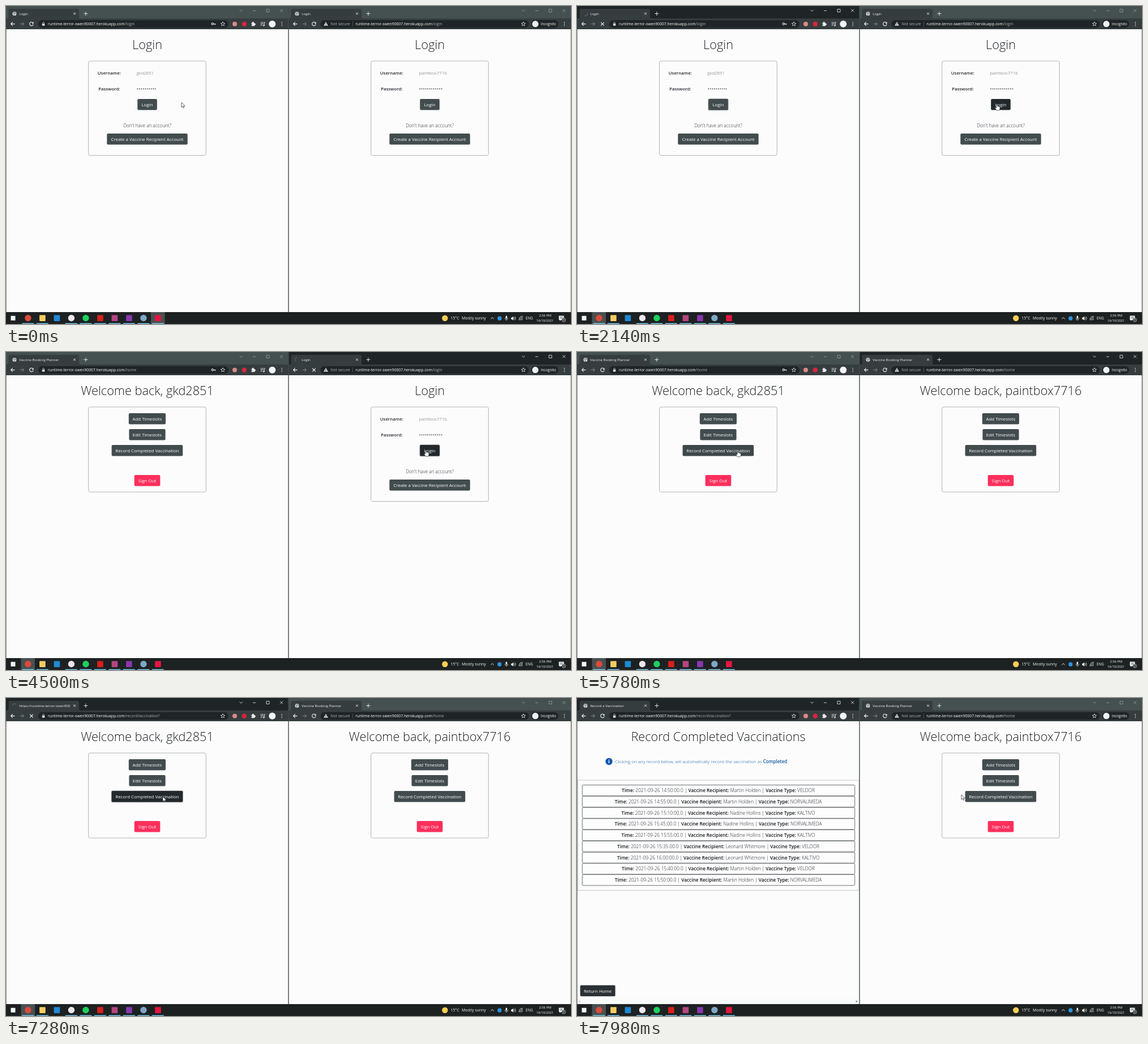
Recreate the animation shown at these times as an HTML page. Size 998x561 px, loop 8000 ms.

```html
<!DOCTYPE html>
<html lang="en">
<head>
<meta charset="utf-8">
<title>Two sessions</title>
<style>
html, body { margin: 0; width: 100%; height: 100%; overflow: hidden; background: #fcfcfd; }
svg { display: block; width: 100vw; height: 100vh; cursor: default; }
text { font-family: "Open Sans", "Noto Sans", sans-serif; }
</style>
</head>
<body>
<svg id="stage" viewBox="0 0 998 561"></svg>
<script>
const LOOP = 8000;
const CLICK_A = 1120, HOME_A = 2620, CLICK_B = 4500, HOME_B = 5300, CLICK_C = 7280, RECORDS = 7720;
const USERS = ['gkd2851', 'paintbox7716'];
const HOST = 'runtime-terror-swen90007.herokuapp.com';
const APP = 'Vaccine Booking Planner';
const PEOPLE = ['Martin Holden', 'Nadine Hollins', 'Leonard Whitmore'];
const TYPES = ['VELDOR', 'NORVALIMEDA', 'KALTIVO'];
// time, person, vaccine
const ROWS = [['14:50', 0, 0], ['14:55', 0, 1], ['15:10', 1, 2], ['15:45', 1, 1], ['15:55', 1, 2],
  ['15:35', 2, 0], ['16:00', 2, 2], ['15:40', 0, 0], ['15:50', 0, 1]];
// time, x, y of the pointer tip
const PATH = [[0, 310, 170], [80, 310, 170], [720, 250, 174], [1220, 250, 174], [2020, 741.5, 173],
  [4850, 741.5, 173], [5780, 284, 174], [6100, 280, 174], [6900, 277, 174], [7440, 277, 174], [7980, 679, 170.5]];
const HOVERS = { loginA: [560, 1270], loginB: [1960, 4930], record: [5760, 7520] };

const within = (t, [a, b]) => t >= a && t < b;
const rect = (x, y, w, h, fill, r = 0, more = '') =>
  `<rect x="${x}" y="${y}" width="${w}" height="${h}" rx="${r}" fill="${fill}" ${more}/>`;
const circle = (x, y, r, fill, more = '') => `<circle cx="${x}" cy="${y}" r="${r}" fill="${fill}" ${more}/>`;
const line = (d, color = '#e4e8e9', w = 1, more = '') =>
  `<path d="${d}" fill="none" stroke="${color}" stroke-width="${w}" ${more}/>`;
const shape = (d, fill, more = '') => `<path d="${d}" fill="${fill}" ${more}/>`;
const text = (x, y, s, size, fill, weight = 400, anchor = 'start', more = '') =>
  `<text x="${x}" y="${y}" font-size="${size}" fill="${fill}" font-weight="${weight}" text-anchor="${anchor}" ${more}>${s}</text>`;
const mid = (y, s, size, fill, weight) => text(249.5, y, s, size, fill, weight, 'middle');
const bold = s => `<tspan font-weight="600">${s}</tspan>`;
const cross = (x, y, r, color, w) => line(`M${x - r} ${y - r}l${2 * r} ${2 * r}m0 ${-2 * r}l${-2 * r} ${2 * r}`, color, w);

// dark: 0 at rest, 1 fully hovered
function button(x, y, w, label, { dark = 0, ring = false, fill } = {}) {
  const mix = (a, b) => Math.round(a + (b - a) * dark);
  fill = fill || `rgb(${mix(66, 34)},${mix(76, 40)},${mix(78, 43)})`;
  return (ring ? rect(x - 0.8, y - 0.8, w + 1.6, 21.1, '#a3a8a9', 2.6) : '') + rect(x, y, w, 19.5, fill, 2) +
    text(x + w / 2, y + 12.8, label, 7.9, '#fff', 500, 'middle');
}

function hoverAmount(t, name) {
  const [a, b] = HOVERS[name];
  if (t < a) return 0;
  return t < b ? Math.min(1, (t - a) / 150) : Math.max(0, 1 - (t - b) / 150);
}

const card = h => rect(145.7, 97, 207.6, h, 'none', 3, 'stroke="#a9aca9" stroke-width=".9"');
const heading = s => mid(76, s, 21.7, '#1c1f22', 300);

function loginPage(user, dots, dark, ring) {
  let s = heading('Login') + card(166.6);
  s += text(182.3, 120.7, 'Username:', 7.8, '#212529', 600, 'middle') + text(182.3, 148.7, 'Password:', 7.8, '#212529', 600, 'middle');
  s += text(230.6, 120.7, user, 7.9, '#5d6265', 300);
  for (let i = 0; i < dots; i++) s += circle(232.2 + i * 3.48, 146.2, 0.9, '#3a3e41');
  return s + button(232.2, 164, 34.6, 'Login', { dark, ring }) + mid(213.5, 'Don\'t have an account?', 8.15, '#212529', 300) +
    button(178.3, 225, 142.4, 'Create a Vaccine Recipient Account');
}

function homePage(user, dark, ring) {
  return heading('Welcome back, ' + user) + card(150) +
    button(216.8, 108, 65.2, 'Add Timeslots') + button(217.4, 136, 64.2, 'Edit Timeslots') +
    button(186.6, 164, 125.6, 'Record Completed Vaccination', { dark, ring }) +
    button(226.7, 217, 45.6, 'Sign Out', { fill: '#fb2f5c' });
}

function recordsPage() {
  let s = heading('Record Completed Vaccinations') + circle(56.5, 112, 6.2, '#1258ae') +
    text(56.5, 115.4, 'i', 9.5, '#fff', 700, 'middle') +
    text(67, 115, 'Clicking on any record below, will automatically record the vaccination as ' + bold('Completed') + '.', 8.05, '#0f55a0', 300);
  s += rect(1.2, 145, 497, 194.3, 'none', 1, 'stroke="#b5b8b5" stroke-width=".8"');
  ROWS.forEach(([time, who, type], i) => {
    const y = 153.5 + i * 19.75;
    s += rect(9.3, y, 481.4, 19.2, '#fdfdfe', 2, 'stroke="#4b4f51" stroke-width=".8"');
    s += mid(y + 12.5, `${bold('Time:')} 2021-09-26 ${time}:00.0 | ${bold('Vaccine Recipient:')} ${PEOPLE[who]} | ${bold('Vaccine Type:')} ${TYPES[type]}`, 8.3, '#16191c', 300);
  });
  return s + button(5.6, 506.7, 62, 'Return Home', { dark: 0.75 }) + rect(1, 531.5, 497, 8, '#f8f9f9') +
    shape('M3.4 535.3l2-1.7v3.4z', '#a9acad') + shape('M494.9 535.3l-2-1.7v3.4z', '#444');
}

function star(x, y) {
  let d = '';
  for (let i = 0; i < 10; i++) {
    const a = i * Math.PI / 5, r = i % 2 ? 1.7 : 3.9;
    d += (i ? 'L' : 'M') + (x + r * Math.sin(a)).toFixed(2) + ' ' + (y - r * Math.cos(a)).toFixed(2);
  }
  return line(d + 'z', '#e4e8e9', 0.8);
}

function windowFrame({ active, loading, title, path, priv, key }, t) {
  const dim = active ? '#f2f4f4' : '#9aa2a3';
  let s = rect(0, 0, 499, 22, active ? '#1f2526' : '#455050') + rect(0, 22, 499, 19, '#363d3f');
  s += shape('M2 22q2.5 0 2.5-3V8q0-3 3-3H126q3 0 3 3v11q0 3 2.5 3z', '#363d3f');
  if (loading) {
    s += line('M15 9.9a3.6 3.6 0 0 0-3.6 3.6 3.6 3.6 0 0 0 1.5 2.9', '#66727c', 0.9, `transform="rotate(${-t * 0.24 % 360} 15 13.5)"`);
  } else {
    s += circle(15, 13.5, 3.6, '#d5d9da') + line('M12.2 12.2q2 0 2.5 1.4t-.3 2.9M15 10.3q-.5 1.9 1.3 2.1t2 1.6', '#4a5153', 1);
  }
  s += text(23.3, 15.8, title, 6.15, '#f0f3f3', 400, 'start', 'clip-path="url(#tab)"');
  s += cross(121, 13.5, 1.9, '#f0f3f3', 0.9) + line('M137.4 13.5h7M140.9 10v7', '#f0f3f3', 0.9);
  s += line('M412.6 6.8l2.6 2.5 2.6-2.5M436 8.3h5M460 5.6h5v5h-5z', dim, 0.8) + cross(486.6, 8, 2.5, dim, 0.8);

  // toolbar
  s += line('M15.5 31.6H8.6m3.2-3.2l-3.2 3.2 3.2 3.2', '#f2f5f5', 1.1) + line('M24.6 31.6h6.9m-3.2-3.2l3.2 3.2-3.2 3.2', '#858c8e', 1);
  s += loading ? cross(45, 31.6, 2.8, '#f2f5f5', 1.2)
    : line('M47.7 29.7a3.3 3.3 0 1 0 .5 2.6', '#f2f5f5', 1.1) + shape('M48.6 27.9v3.3h-3.3z', '#f2f5f5');
  s += priv ? rect(56.5, 25, 368, 13.4, '#1f2526', 6.7) : rect(57, 25, 336, 13.4, '#1f2526', 6.7);
  const url = x => text(x, 34, `${HOST}<tspan fill="#a6aeb0" font-weight="400">${path}</tspan>`, 6.78, '#fff', 500);
  if (priv) {
    s += shape('M66 27.8l3.9 7h-7.8z', '#d5d9da') + rect(65.6, 30.3, 0.8, 2.2, '#1f2425') + rect(65.6, 33.2, 0.8, 0.8, '#1f2425');
    s += text(74.3, 34, 'Not secure', 6.8, '#b0b7b9') + rect(113.2, 27.5, 0.6, 8.4, '#6b7375') + url(118.3) + star(415, 31.7);
    s += rect(428.5, 25, 48, 13.4, '#1f2526', 6.7) + circle(436, 31.7, 5.6, '#eef1f1') + text(445.8, 33.9, 'Incognito', 6.2, '#fff');
  } else {
    s += rect(63.8, 31, 4.6, 3.7, '#d5d9da', 0.5) + line('M64.8 31v-1.3a1.3 1.3 0 0 1 2.6 0V31', '#d5d9da', 0.8) + url(74);
    if (key) s += circle(364.8, 31.6, 1.7, 'none', 'stroke="#e4e8e9" stroke-width="1.1"') + line('M366.5 31.6h3.8m-.9 0v1.7', '#e4e8e9', 1.2);
    s += star(383, 31.7) + circle(404, 31.7, 4, '#dd8a87') + circle(420.8, 31.7, 4.3, '#d3273f');
    s += rect(433.4, 29.4, 6, 5.8, '#e9eced', 0.7) + circle(436.2, 29.1, 1.3, '#e9eced') + circle(439.7, 32.2, 1.3, '#e9eced') + circle(433.6, 32.4, 1, '#363d3f');
    s += line('M449.6 29h5.6M449.6 31.5h5.6M449.6 34h3.2M456.3 34.5v-5.6h1.8', '#e9eced', 0.9) + circle(455.3, 34.4, 1.2, '#e9eced');
    s += circle(470.3, 31.7, 6, '#f4f6f7');
  }
  for (const y of [28.9, 31.7, 34.5]) s += circle(487.3, y, 0.8, '#e4e8e9');
  return s;
}

function taskbar(recorderFront) {
  // colour, round, open
  const apps = [['#dc4b3c', 1, 1], ['#f3cd63', 0, 1], ['#1e8ad2', 0, 0], ['#ece6ea', 1, 1], ['#1ed05f', 1, 1],
    ['#d8201c', 0, 1], ['#b3467f', 0, 1], ['#8a37ae', 0, 1], ['#7fa6c6', 1, 1], ['#e3163f', 0, 1]];
  let s = rect(0, 540, 998, 21, '#1d2122') + rect(8.5, 546.7, 8, 8, '#f3f5f5');
  apps.forEach(([color, round, open], i) => {
    const x = 38.9 + i * 25.5;
    if (i === (recorderFront ? 9 : 0)) s += rect(x - 12.4, 540, 24.6, 21, '#4a5051');
    s += round ? circle(x, 550.5, 5.7, color) : rect(x - 5.3, 545.3, 10.6, 10.6, color, 1);
    if (open) s += rect(x - 10.6, 559.5, 21, 1.5, '#76c3e4');
  });
  const w = '#fafbfb';
  s += circle(775.3, 550.7, 5.2, '#f8cf55') + text(785.3, 553.4, '15°C', 6.9, w) + text(805, 553.4, 'Mostly sunny', 6.95, w);
  s += line('M856.2 552.2l2.8-2.7 2.8 2.7', w, 0.9) + circle(871.8, 551, 3.7, '#2f93dc');
  s += rect(882.6, 546.6, 2.6, 5, w, 1.3) + line('M881.2 550.5q0 2.8 2.7 2.8t2.7-2.8M883.9 553v2', w, 0.7);
  s += shape('M892.3 549.5h1.7l2.2-2v7.2l-2.2-2h-1.7z', w) + line('M897.5 549q1.4 2 0 4M899 547.7q2.6 3.3 0 6.6', w, 0.7);
  s += line('M906.3 554.3q0-6.8 6.4-6.8M908.6 554.3q0-4.5 4.1-4.5M910.8 554.3q0-2.2 1.9-2.2', w, 0.9);
  s += text(924.4, 553, 'ENG', 6.2, w, 400, 'middle') + text(952.3, 548.2, '2:56 PM', 5.8, w, 400, 'middle') + text(952.1, 557.2, '16/10/2021', 5.7, w, 400, 'middle');
  s += shape('M976.6 546.5h8.8v7.2h-5.2l-2 2v-2h-1.6z', w) + line('M978.3 548.7h5.4M978.3 550.8h5.4', '#1d2122', 0.7);
  return s + circle(985.3, 553.8, 3.4, '#3a4244', 'stroke="#cfd4d5" stroke-width=".6"') + text(985.3, 555.8, '7', 5, w, 400, 'middle');
}

function pointer(t) {
  let i = 1;
  while (i < PATH.length - 1 && t > PATH[i][0]) i++;
  const [t0, x0, y0] = PATH[i - 1], [t1, x1, y1] = PATH[i];
  const u = Math.min(1, (t - t0) / (t1 - t0)), e = u * u * (3 - 2 * u);
  const hand = t < CLICK_C && Object.values(HOVERS).some(span => within(t, span));
  const d = hand
    ? 'M-.9 .9Q0-.4 .9 .9V4.2Q2-.1 2.4 4.3 3.6 3.3 4 4.7 5.4 4 5.5 5.4V8Q5.3 9.6 4.4 11H-.5Q-1.4 9.3-3 7.2-3.2 5.7-1.9 6.2L-.9 7.1z'
    : 'M0 0V8.6L2 6.8 3.3 9.8 4.7 9.2 3.4 6.3H6.1z';
  return shape(d, '#fff', `stroke="#222729" stroke-width=".7" stroke-linejoin="round" transform="translate(${x0 + (x1 - x0) * e} ${y0 + (y1 - y0) * e})"`);
}

function scene(t) {
  const rightFront = within(t, [CLICK_B, CLICK_C]);
  const homeA = t >= HOME_A, homeB = t >= HOME_B, recording = t >= CLICK_C, records = t >= RECORDS;
  const left = {
    active: t >= CLICK_A && !rightFront,
    loading: within(t, [CLICK_A, HOME_A]) || within(t, [CLICK_C, RECORDS]),
    title: records ? 'Record a Vaccination' : recording ? 'https://' + HOST : homeA ? APP : 'Login',
    path: recording ? '/recordVaccination?' : homeA ? '/home' : '/login',
    key: !recording
  };
  const right = {
    active: rightFront, loading: within(t, [CLICK_B, HOME_B]), priv: true,
    title: homeB ? APP : 'Login', path: homeB ? '/home' : '/login'
  };
  const pageA = records ? recordsPage()
    : homeA ? homePage(USERS[0], hoverAmount(t, 'record'), recording)
    : loginPage(USERS[0], 10, hoverAmount(t, 'loginA'), t >= CLICK_A);
  const pageB = homeB ? homePage(USERS[1], 0, false)
    : loginPage(USERS[1], 12, hoverAmount(t, 'loginB'), t >= CLICK_B);
  return '<defs><clipPath id="tab"><rect x="22" y="5" width="91" height="17"/></clipPath></defs>' +
    rect(0, 0, 998, 561, '#fcfcfd') + windowFrame(left, t) + pageA +
    `<g transform="translate(499 0)">${windowFrame(right, t)}${pageB}</g>` +
    rect(0, 41, 0.8, 499, '#6d7273') + rect(498.3, 0, 1.4, 540, '#454a4b') + rect(997.3, 41, 0.7, 499, '#85898a') +
    taskbar(t < CLICK_A) + pointer(t);
}

const stage = document.getElementById('stage');
const start = performance.now();
function frame() {
  stage.innerHTML = scene((performance.now() - start) % LOOP);
  requestAnimationFrame(frame);
}
frame();
</script>
</body>
</html>
```
